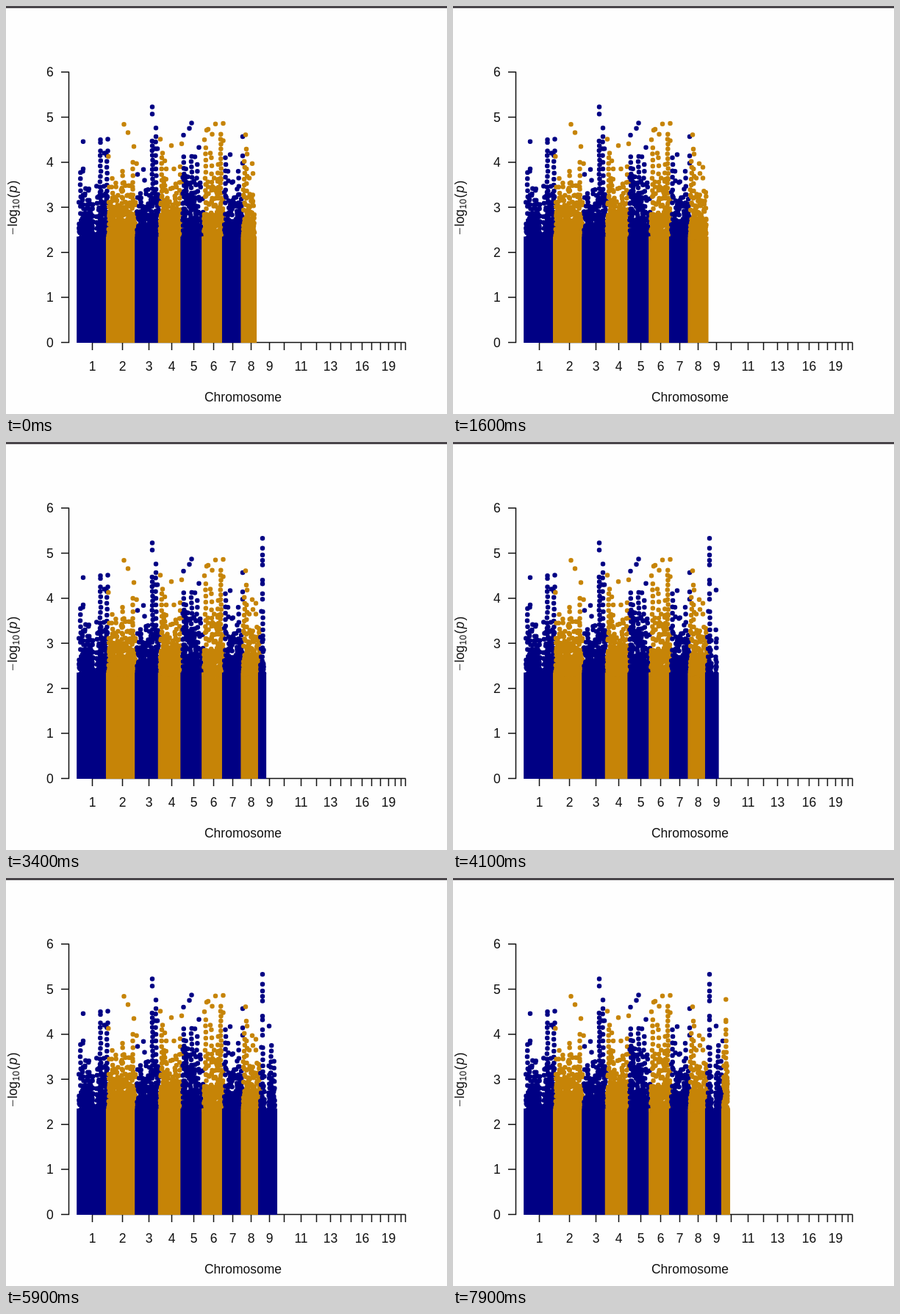
An HTML page with a canvas for the animation above (8 s loop, 600x556 px).

```html
<!DOCTYPE html>
<html lang="en">
<head>
<meta charset="utf-8">
<title>Manhattan plot</title>
<style>
  html, body { margin: 0; width: 100%; height: 100%; overflow: hidden; background: #fefefe; }
  svg, canvas { position: absolute; left: 0; top: 0; width: 600px; height: 556px; }
  text { font: 17.5px "Liberation Sans", Arial, sans-serif; fill: #111; }
  .mid { text-anchor: middle; }
  .sub { font-size: 12.3px; }
  .it { font-style: italic; }
  path { stroke: #111; stroke-width: 1.5; fill: none; }
</style>
</head>
<body>
<svg viewBox="0 0 600 556">
  <rect width="600" height="3" fill="#4a464b"/>
  <path id="axes"/>
  <g id="labels"></g>
  <text class="mid" x="322.5" y="539">Chromosome</text>
  <g transform="translate(15 312) rotate(-90)">
    <text x="0" y="0" fill-opacity=".7">−</text>
    <text x="11.5" y="0">log</text>
    <text class="sub" x="35.3" y="3">10</text>
    <text x="50.5" y="0">(</text>
    <text class="it" x="57.5" y="0">p</text>
    <text x="68.5" y="0">)</text>
  </g>
</svg>
<canvas id="plot" width="600" height="556"></canvas>
<script>
const LOOP = 8000, STEP = 100, R = 3.25, BODY = 2.35;
const COLORS = ['#000084', '#c68407'];
const yOf = v => 458.5 - 61.4 * v;

// Axes and their labels
const ticks = [117, 158, 194, 225, 255, 282, 308, 333, 358, 378, 401,
  422, 441, 455, 469, 484, 497, 509, 520, 529, 537, 543];
const shown = [1, 2, 3, 4, 5, 6, 7, 8, 9, 11, 13, 16, 19];
const labels = document.getElementById('labels');

function label(x, y, str) {
  const el = document.createElementNS('http://www.w3.org/2000/svg', 'text');
  el.setAttribute('class', 'mid');
  el.setAttribute('x', x);
  el.setAttribute('y', y);
  el.textContent = str;
  labels.append(el);
}

let d = 'M85.5 89.4V459.2M117 458.5H543.7';
for (let v = 0; v <= 6; v++) {
  d += `M75 ${yOf(v)}H85.5`;
  label(59.8, yOf(v) + 6.2, v);
}
ticks.forEach(x => d += `M${x + 0.5} 458.5V469`);
shown.forEach(n => label(ticks[n - 1] + 0.5, 497, n));
document.getElementById('axes').setAttribute('d', d);

// peaks: [x, values...]; stacks: [x, low, high, count]
const chromosomes = [
  { from: 99.2, to: 138.6, gap: [118.5, 123], cap: 3.5,
    peaks: [[105, 4.46, 3.85], [104.5, 3.8], [128.5, 4.5, 4.44, 4.25], [134, 4.2], [138.5, 4.51, 4.25]],
    stacks: [[101.5, 3.1, 3.77, 6], [128.5, 3.1, 4.15, 10], [137.5, 3.1, 4.15, 9]] },
  { from: 139, to: 177.7, cap: 3.6,
    peaks: [[139.3, 4.13], [160.5, 4.84], [166, 4.66], [174, 4.35], [177.6, 3.97], [144.5, 3.64], [158.5, 3.8]],
    stacks: [[159, 3.2, 3.7, 4], [172.5, 3.1, 4, 7]] },
  { from: 178.2, to: 209, cap: 3.4,
    peaks: [[187, 3.84], [179, 3.73], [188.5, 3.6], [199, 5.23, 5.07], [204, 4.76, 4.57], [206, 4.3]],
    stacks: [[199.3, 3.1, 4.47, 14], [204, 3.1, 4.45, 10]] },
  { from: 209.8, to: 239.6, cap: 3.7,
    peaks: [[210, 4.51], [225, 4.37], [239, 4.41], [213, 4.2], [216, 4.03], [218, 3.85], [228.5, 3.85]],
    stacks: [[211.5, 3.1, 4.1, 9], [236.5, 3.2, 3.9, 5]] },
  { from: 240.4, to: 268.6, cap: 3.7,
    peaks: [[241.5, 4.6], [249.5, 4.75], [252.5, 4.87], [262.5, 4.33], [257, 4.12]],
    stacks: [[242, 3.1, 4.12, 9], [252.5, 3.2, 4.13, 9], [245, 3.2, 3.85, 5], [260, 3.2, 3.95, 6]] },
  { from: 269.2, to: 296.2, cap: 3.7,
    peaks: [[273, 4.71], [275, 4.73], [280.5, 4.62], [285, 4.85], [295.5, 4.86, 4.48], [270, 4.5], [278, 4.2]],
    stacks: [[271.5, 3.1, 4.32, 10], [292.3, 3.1, 4.62, 15], [280, 3.2, 4.1, 6], [288.5, 3.2, 3.95, 5]] },
  { from: 297, to: 321.8, cap: 3.6,
    peaks: [[322, 4.57, 4.14, 3.98], [305, 4.17], [298.5, 4.1], [302, 3.8], [316, 3.8]],
    stacks: [[298.5, 3.1, 3.95, 7], [316.5, 3.1, 3.65, 4]] },
  { from: 322.5, to: 345.3, cap: 3.45,
    peaks: [[326, 4.61], [327, 4.29], [328, 4.18], [335, 3.97], [340, 3.89, 3.65], [331, 3.65], [336, 3.75]],
    stacks: [[324.5, 3.1, 4.02, 8], [327.5, 3.2, 3.85, 5]] },
  { from: 346, to: 367.3, gap: [351.8, 357.3], cap: 3.15,
    peaks: [[347.5, 3.71], [349, 5.33, 5.11, 4.96, 4.84, 4.74, 4.4, 4.32, 4.1, 3.98], [358, 4.18], [367, 3.85]],
    stacks: [[349.3, 2.9, 3.7, 7], [360.8, 2.9, 3.75, 8], [358, 2.5, 3.3, 5], [365, 2.8, 3.4, 5]] },
  { from: 368, to: 389, cap: 3.1,
    peaks: [[368.4, 3.6, 3.5, 3.3, 3.05], [371.3, 4.77, 4.31, 4.28, 4.1, 4]],
    stacks: [[371.3, 2.6, 3.85, 11], [373, 2.5, 3.3, 7]] }
];

function seeded(s) {
  return () => {
    s = (s + 0x6D2B79F5) | 0;
    let t = Math.imul(s ^ (s >>> 15), 1 | s);
    t ^= t + Math.imul(t ^ (t >>> 7), 61 | t);
    return ((t ^ (t >>> 14)) >>> 0) / 4294967296;
  };
}

// Uniform p-values give an exponential tail above the solid body
function makeDots(c, i) {
  const rnd = seeded(71 + i * 13), dots = [];
  const count = (c.to - c.from) * 8.5;
  for (let k = 0; k < count; k++) {
    const x = c.from + rnd() * (c.to - c.from);
    const v = BODY - 0.05 - Math.log10(1 - rnd());
    const inGap = c.gap && x > c.gap[0] && x < c.gap[1];
    if (v <= c.cap && !inGap) dots.push([x, v]);
  }
  for (const [x, ...vs] of c.peaks) vs.forEach(v => dots.push([x, v]));
  for (const [x, low, high, n] of c.stacks) {
    for (let k = 0; k < n; k++) {
      dots.push([x + (rnd() - 0.5) * 1.2, low + (high - low) * k / (n - 1)]);
    }
  }
  return dots;
}
chromosomes.forEach((c, i) => c.dots = makeDots(c, i));

// Time and the x reached; the short steep piece skips a centromere
const sweep = [[0, 338], [1600, 344.5], [2700, 348.5], [3600, 351.8], [3700, 357.3],
  [4100, 358.6], [5100, 363], [6700, 369], [7900, 374]];

function frontAt(t) {
  const k = Math.max(1, sweep.findIndex(p => p[0] >= t));
  const [t0, x0] = sweep[k - 1], [t1, x1] = sweep[k];
  return x0 + (x1 - x0) * (t - t0) / (t1 - t0);
}

const g = document.getElementById('plot').getContext('2d');
g.beginPath();
g.rect(0, 0, 600, 459);
g.clip();

function draw(front) {
  g.clearRect(0, 0, 600, 556);
  chromosomes.forEach((c, i) => {
    if (c.from > front) return;
    const left = c.from - R + 0.2, right = Math.min(c.to, front) + R - 0.2;
    g.fillStyle = COLORS[i % 2];
    g.fillRect(left, yOf(BODY), right - left, 460 - yOf(BODY));
    g.beginPath();
    for (const [x, v] of c.dots) {
      if (x > front) continue;
      g.moveTo(x + R, yOf(v));
      g.arc(x, yOf(v), R, 0, Math.PI * 2);
    }
    g.fill();
  });
}

let last = -1;
function tick() {
  const step = Math.floor(performance.now() % LOOP / STEP);
  if (step !== last) draw(frontAt(step * STEP));
  last = step;
  requestAnimationFrame(tick);
}
tick();
</script>
</body>
</html>
```
